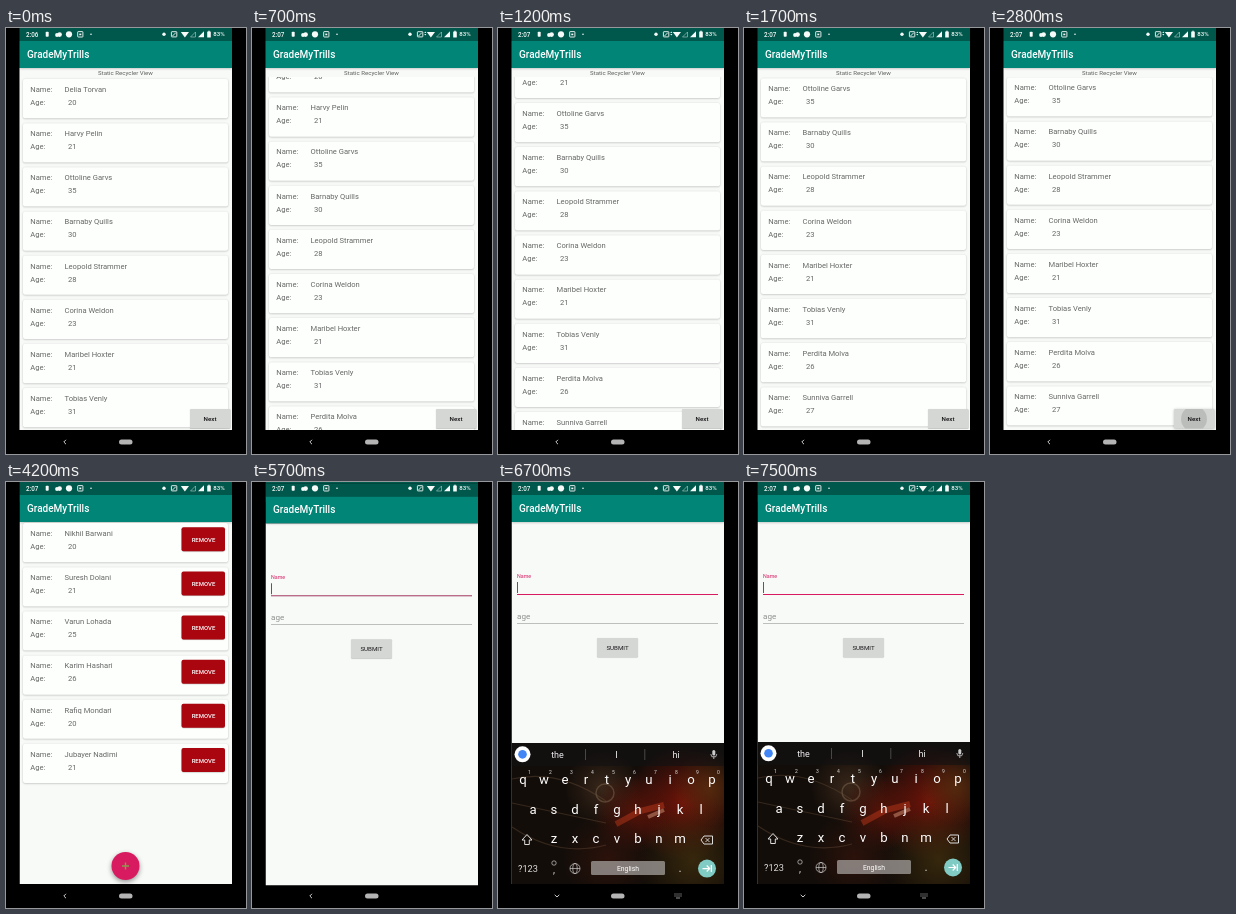
Recreate the animation shown at these times as an HTML page with a canvas. Size 240 by 426 pixels, loop 8000 ms.

```html
<!DOCTYPE html>
<html lang="en">
<head>
<meta charset="utf-8">
<title>People list</title>
<style>
  html, body { margin: 0; height: 100%; overflow: hidden; background: #000; }
  canvas { display: block; width: 240px; height: 426px; }
</style>
</head>
<body>
<canvas id="stage" width="240" height="426"></canvas>
<script>
const ctx = document.getElementById('stage').getContext('2d');
const LOOP = 8000, LEFT = 13.5, WIDTH = 212.5, NAV = 402, PITCH = 44.14;
const PINK = '#d81b60', PAPER = '#f8faf8', BUTTON = '#d5d7d5', GREY = '#666866', SHADE = '#0004';

const parse = s => s.split(',').map(row => row.split(':'));
const singers = parse('Delia Torvan:20,Harvy Pelin:21,Ottoline Garvs:35,Barnaby Quills:30,' +
  'Leopold Strammer:28,Corina Weldon:23,Maribel Hoxter:21,Tobias Venly:31,Perdita Molva:26,Sunniva Garrell:27');
const members = parse('Nikhil Barwani:20,Suresh Dolani:21,Varun Lohada:25,' +
  'Karim Hashari:26,Rafiq Mondari:20,Jubayer Nadimi:21');

const clamp = v => Math.min(1, Math.max(0, v));
const progress = (t, from, to) => clamp((t - from) / (to - from));
const smooth = p => p * p * (3 - 2 * p);

function text(s, x, y, size, color, align = 'left', weight = 400) {
  ctx.font = `${weight} ${size}px Roboto, sans-serif`;
  ctx.textAlign = align;
  ctx.fillStyle = color;
  ctx.fillText(s, x, y + size * 0.355);
}
function rect(x, y, w, h, color, r = 0) {
  ctx.fillStyle = color;
  ctx.beginPath();
  ctx.roundRect(x, y, w, h, r);
  ctx.fill();
}
function disc(x, y, r, color) {
  ctx.fillStyle = color;
  ctx.beginPath();
  ctx.arc(x, y, r, 0, 7);
  ctx.fill();
}
function path(points, color, width) {
  ctx.beginPath();
  for (let i = 0; i < points.length; i += 2) ctx.lineTo(points[i], points[i + 1]);
  if (width) {
    ctx.strokeStyle = color;
    ctx.lineWidth = width;
    ctx.stroke();
  } else {
    ctx.fillStyle = color;
    ctx.fill();
  }
}
function frame(x, y, w, h, color, width, r = 0) {
  ctx.strokeStyle = color;
  ctx.lineWidth = width;
  ctx.beginPath();
  ctx.roundRect(x, y, w, h, r);
  ctx.stroke();
}
function clipped(x, y, w, h, draw) {
  ctx.save();
  ctx.beginPath();
  ctx.rect(x, y, w, h);
  ctx.clip();
  draw();
  ctx.restore();
}
function shadowed(blur, dy, color, draw) {
  ctx.save();
  ctx.shadowBlur = blur;
  ctx.shadowOffsetY = dy;
  ctx.shadowColor = color;
  draw();
  ctx.restore();
}

function appWindow() {
  rect(LEFT, 0, WIDTH, 426, '#000');
  rect(LEFT, 40, WIDTH, NAV - 40, PAPER);
  shadowed(2, 0.5, '#0003', () => rect(LEFT, 13, WIDTH, 27, '#008577'));
  rect(LEFT, 0, WIDTH, 13, '#00574b');
  text('GradeMyTrills', 21, 26.7, 10, '#fff', 'left', 500);
}

function card([name, age], y) {
  shadowed(2, 0.5, SHADE, () => rect(17, y - 10.3, 205, 39.3, '#fdfffd', 2));
  text('Name:', 24.3, y, 7.6, GREY);
  text(name, 58.5, y, 7.6, GREY);
  text('Age:', 24.3, y + 13, 7.6, GREY);
  text(age, 62, y + 13, 7.6, GREY);
}

function singerScreen(t) {
  appWindow();
  text('Static Recycler View', 119.5, 44.7, 6.1, '#5c5e5c', 'center');
  const scroll = 90 * smooth(progress(t, 100, 1800));
  clipped(LEFT, 49, WIDTH, NAV - 49, () =>
    singers.forEach((s, i) => card(s, 61.3 + i * PITCH - scroll)));

  const press = t >= 2800 ? progress(t, 2650, 3000) : 0;
  shadowed(1 + 4 * press, 0.5, SHADE, () => rect(184, 381, 40.5, 19.5, BUTTON, 1));
  if (press) clipped(184, 381, 40.5, 19.5, () => disc(204, 391, 30 * press, '#0000001f'));
  text('Next', 204, 390.6, 6.2, '#111', 'center', 500);
}

function memberScreen(t) {
  appWindow();
  clipped(LEFT, 40, WIDTH, NAV - 40, () => members.forEach((m, i) => {
    const y = 51.3 + i * PITCH;
    card(m, y);
    shadowed(1, 0.5, SHADE, () => rect(175.5, y - 6, 43.5, 24, '#a90610', 2));
    text('REMOVE', 197.5, y + 6.4, 6, '#fff', 'center', 500);
  }));
  const press = t >= 5200 ? progress(t, 5100, 5400) : 0;
  shadowed(5 + 3 * press, 2, '#0006', () => disc(119.5, 384, 14, PINK));
  if (press) disc(119.5, 384, 14 * press, '#ffffff3a');
  path([116, 384, 123, 384], '#8a9a4c', 1.4);
  path([119.5, 380.5, 119.5, 387.5], '#8a9a4c', 1.4);
}

function formScreen(t) {
  appWindow();
  text('Name', 19, 93.8, 5.3, PINK);
  if (Math.floor(t / 500) % 2) rect(19, 100, 1, 11, PINK);
  rect(19, 112, 201, 1, '#8a8a8a');
  ctx.globalAlpha = progress(t, 5450, 5900);
  rect(19, 112, 201, 1, PINK);
  ctx.globalAlpha = 1;
  text('age', 19, 134, 8.1, '#8e908e');
  rect(19, 141, 201, 0.8, '#a9aba9');
  shadowed(1, 0.5, SHADE, () => rect(99, 156, 41, 19, BUTTON, 1));
  text('SUBMIT', 119.5, 165.5, 6.2, '#1a1a1a', 'center');
}

// Dark warm backdrop behind the keys
function backdrop() {
  const top = 260, height = NAV - top;
  rect(LEFT, top, WIDTH, height, '#130d09');
  const glow = (x, y, r, color) => {
    const g = ctx.createRadialGradient(x, y, 0, x, y, r);
    g.addColorStop(0, color);
    g.addColorStop(1, color.slice(0, 7) + '00');
    rect(LEFT, top, WIDTH, height, g);
  };
  glow(105, 305, 38, '#4a3322b0');
  glow(185, 320, 58, '#7c1408e0');
  glow(135, 330, 40, '#641408c0');
  glow(212, 305, 38, '#5c3410b0');
  glow(195, 378, 55, '#41300ec0');
  glow(110, 375, 45, '#3a150ca0');
  path([118, 341, 142, 328, 166, 322], '#c83c1c70', 6);
  path([150, 334, 166, 327], '#e8a88870', 4);
  frame(98, 301, 18, 18, '#8a705870', 1.5, 9);
  for (let i = 0; i < 3; i++) {
    ctx.strokeStyle = '#7a5c4455';
    ctx.lineWidth = 1.2;
    ctx.beginPath();
    ctx.moveTo(14, 296 + i * 24);
    ctx.quadraticCurveTo(60, 285 + i * 45, 108, 318 + i * 22);
    ctx.stroke();
  }
  rect(LEFT, top, WIDTH, 23, '#12121399');
}

function keyRow(letters, x, y) {
  [...letters].forEach((c, i) => text(c, x + i * 21, y, 13.2, '#fff', 'center'));
}

function keyboard() {
  backdrop();
  disc(24.5, 271.3, 8, '#fff');
  disc(24.5, 271.3, 4.3, '#4285f4');
  text('the', 59.5, 271.5, 9, '#eee', 'center');
  text('I', 118.5, 271.5, 9, '#eee', 'center');
  text('hi', 178, 271.5, 9, '#eee', 'center');
  rect(87, 266, 0.7, 11, '#fff5');
  rect(146.5, 266, 0.7, 11, '#fff5');
  rect(214.3, 267, 3, 5.5, '#ccc', 1.5);
  path([212.8, 271, 213.8, 273.7, 217.8, 273.7, 218.8, 271], '#ccc', 0.8);
  path([215.8, 273.7, 215.8, 276], '#ccc', 0.9);

  keyRow('qwertyuiop', 25, 296.3);
  [...'1234567890'].forEach((d, i) => text(d, 31.5 + i * 21, 289.5, 5, '#ddd', 'center'));
  keyRow('asdfghjkl', 35, 326);
  keyRow('zxcvbnm', 56, 355.6);

  path([29, 351.5, 34, 357, 31.3, 357, 31.3, 361.5, 26.7, 361.5, 26.7, 357, 24, 357, 29, 351.5], '#ddd', 1);
  path([203, 357, 206, 353, 214.5, 353, 214.5, 361, 206, 361, 203, 357], '#ddd', 1);
  path([207.5, 355, 211.5, 359], '#ddd', 0.9);
  path([211.5, 355, 207.5, 359], '#ddd', 0.9);

  text('?123', 30, 385.5, 9.2, '#ddd', 'center');
  text(',', 56, 386, 10, '#ddd', 'center');
  ctx.strokeStyle = '#ccc';
  ctx.lineWidth = 0.7;
  ctx.beginPath();
  ctx.arc(56, 380, 2.2, 0, 7);
  ctx.moveTo(82, 385.5);
  ctx.arc(77, 385.5, 5, 0, 7);
  ctx.moveTo(79.2, 385.5);
  ctx.ellipse(77, 385.5, 2.2, 5, 0, 0, 7);
  ctx.moveTo(72, 385.5);
  ctx.lineTo(82, 385.5);
  ctx.stroke();
  rect(93, 378, 74, 14, '#aaa5a2b8', 1.5);
  text('English', 130, 385.3, 6.8, '#fff', 'center');
  text('.', 182, 385, 12, '#ddd', 'center');
  disc(209, 385.5, 9, '#80cbc4');
  path([204.5, 385.5, 211.5, 385.5], '#fff', 1.2);
  path([208.7, 382.5, 211.7, 385.5, 208.7, 388.5], '#fff', 1.2);
  path([213.3, 382, 213.3, 389], '#fff', 1.2);
}

function statusIcons(t) {
  const white = '#f6faf9';
  text(t < 500 ? '2:06' : '2:07', 20, 6.3, 6.3, white, 'left', 500);
  rect(39.7, 3.8, 3, 5, white, 0.8);
  disc(51, 7, 1.9, white);
  disc(53.6, 6.6, 2.3, white);
  disc(63, 6.3, 3.1, white);
  frame(71.7, 3.6, 5.2, 5.4, white, 0.9, 0.5);
  rect(73.3, 5.6, 2, 1.6, white);
  disc(85, 6.3, 0.8, white);

  disc(158, 6.3, 1.7, white);
  frame(165.4, 3.7, 5.4, 5.2, white, 0.9, 0.5);
  path([166.5, 8, 169.8, 4.7], white, 0.9);
  path([174.8, 4, 183, 4, 178.9, 9.5], white);
  if ((t >= 500 && t < 4200) || t >= 7000) {
    path([172.3, 5, 174.3, 5, 173.3, 3.4], white);
    path([172.3, 6, 174.3, 6, 173.3, 7.6], white);
  }
  path([184.5, 9, 189.5, 9, 189.5, 4, 184.5, 9], '#b5d0cb', 0.6);
  path([192, 9.3, 198, 9.3, 198, 3.3], white);
  rect(201.2, 3.5, 3.6, 6, white, 0.5);
  rect(202.2, 2.8, 1.6, 1, white);
  text('83%', 207.3, 6.3, 6.1, white, 'left', 500);
}

function navIcons(typing) {
  rect(113, 411.5, 13.5, 5, '#b4b4b4', 2.5);
  if (!typing) {
    path([60, 411.8, 57.8, 414, 60, 416.2], '#ccc', 1);
    return;
  }
  path([56.7, 412.8, 59, 415, 61.3, 412.8], '#ccc', 1);
  for (let i = 0; i < 4; i++) {
    rect(176.5 + i * 2, 411.6, 1, 1, '#bbb');
    rect(176.5 + i * 2, 413.6, 1, 1, '#bbb');
  }
  rect(178, 415.6, 4, 0.8, '#bbb');
}

// The next screen is uncovered from the bottom while both drift upward
function openScreen(current, next, p, t) {
  const left = 1 - p, top = 409 * left ** 5;
  const shifted = (screen, dy) => {
    ctx.save();
    ctx.translate(0, dy);
    screen(t);
    ctx.restore();
  };
  if (left ** 5 > 0.002) shifted(current, -8.4 * (1 - left ** 2));
  clipped(LEFT, top < 2 ? 0 : top, WIDTH, 426, () => {
    rect(LEFT, 0, WIDTH, 20, '#00574b');
    shifted(next, 17 * left ** 2);
  });
}

function draw(t) {
  rect(0, 0, 240, 426, '#000');
  const first = progress(t, 2950, 3500), second = progress(t, 5300, 5850);
  if (second > 0) openScreen(memberScreen, formScreen, second, t);
  else if (first > 0) openScreen(singerScreen, memberScreen, first, t);
  else singerScreen(t);

  const rise = progress(t, 6300, 6850);
  if (rise > 0) {
    clipped(LEFT, 0, WIDTH, NAV, () => {
      ctx.globalAlpha = clamp(rise * 1.5);
      ctx.translate(0, 14 * (1 - rise) ** 2);
      keyboard();
    });
  }
  statusIcons(t);
  navIcons(rise > 0);
}

function tick() {
  draw(performance.now() % LOOP);
  requestAnimationFrame(tick);
}
tick();
</script>
</body>
</html>
```
